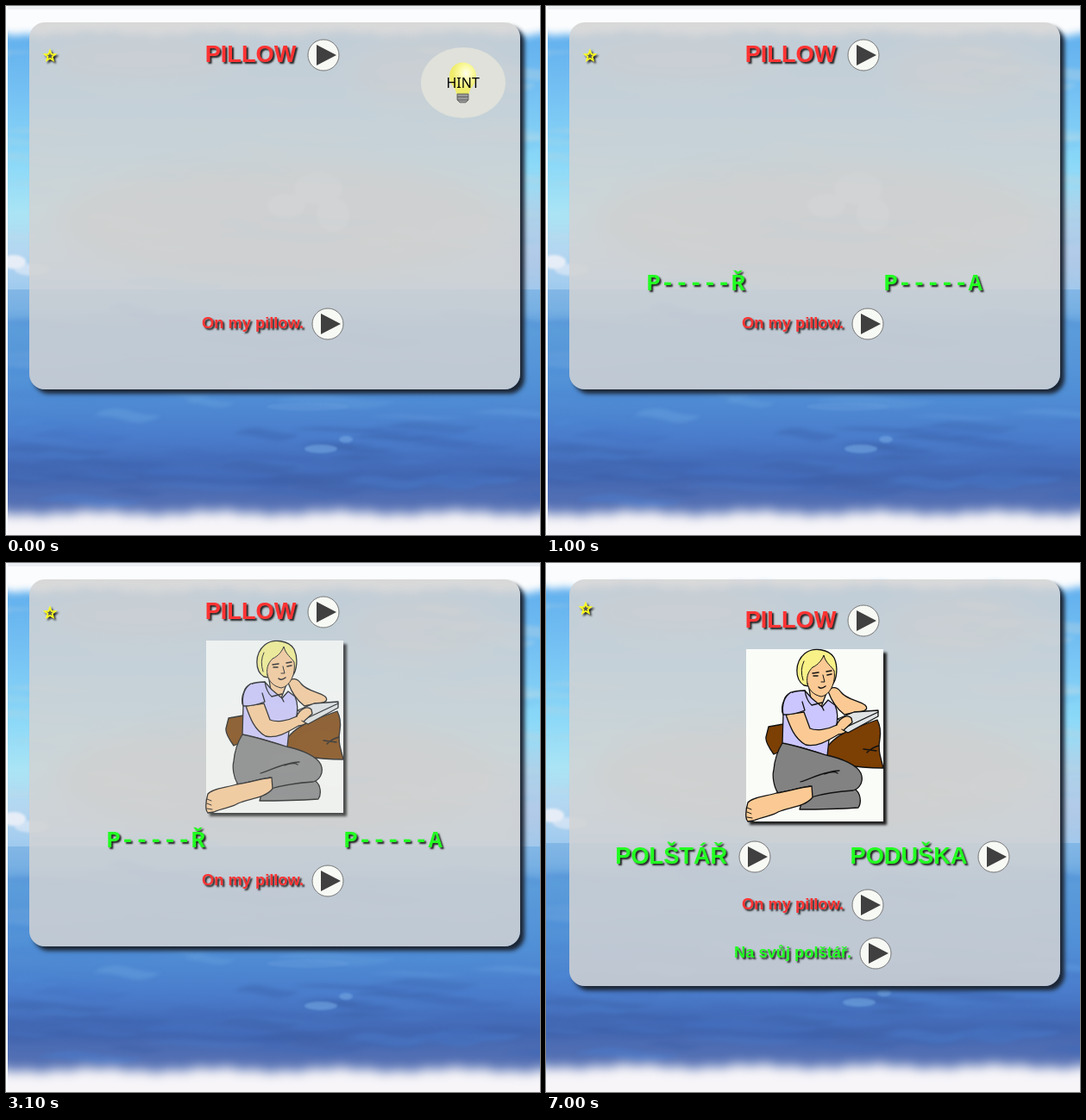
Recreate the animation shown at these times as an HTML page. Size 619 by 614 pixels, loop 8000 ms.

```html
<!DOCTYPE html>
<html lang="en">
<head>
<meta charset="utf-8">
<title>Vocabulary card</title>
<style>
  html, body { margin: 0; width: 100%; height: 100%; overflow: hidden; background: #fbfcfd; }
  svg, #panel { position: absolute; left: 0; top: 0; }
  #panel {
    left: 27px; top: 19px; width: 569px; height: 426px; border-radius: 18px;
    background: rgba(211, 211, 211, .85); box-shadow: 5px 5px 5px #1c2533;
  }
  text { font: bold 27.2px "Liberation Sans", Arial, sans-serif; text-shadow: 2px 2px 2px #222; white-space: pre; }
  .small { font-size: 18.3px; }
  .mono { font-family: "Liberation Mono", "Courier New", monospace; }
  .en { fill: #f33; }
  .cs { fill: #2f2; }
  #hint text { font: 16px "Noto Sans", "Open Sans", sans-serif; text-shadow: none; }
  #line { stroke: #111; stroke-width: 1.3; stroke-linejoin: round; stroke-linecap: round; }
</style>
</head>
<body>
<svg width="619" height="614">
  <defs>
    <linearGradient id="sky" gradientUnits="userSpaceOnUse" x1="0" y1="0" x2="0" y2="329">
      <stop offset=".1" stop-color="#62b0ee"/>
      <stop offset=".3" stop-color="#74c0f3"/>
      <stop offset=".55" stop-color="#8ad8f8"/>
      <stop offset=".73" stop-color="#aae4f5"/>
      <stop offset=".87" stop-color="#b4d6f0"/>
      <stop offset="1" stop-color="#9fcaee"/>
    </linearGradient>
    <linearGradient id="sea" gradientUnits="userSpaceOnUse" x1="0" y1="329" x2="0" y2="614">
      <stop offset="0" stop-color="#82b7e6"/>
      <stop offset=".08" stop-color="#78b0e3"/>
      <stop offset=".16" stop-color="#5b9cdb"/>
      <stop offset=".4" stop-color="#5190d6"/>
      <stop offset=".6" stop-color="#4a7dcc"/>
      <stop offset=".76" stop-color="#4266b1"/>
      <stop offset=".88" stop-color="#5571b4"/>
    </linearGradient>
    <clipPath id="skyClip"><path d="M2 4H640V329H2z"/></clipPath>
    <clipPath id="seaClip"><path d="M2 329H640V630H2z"/></clipPath>
  </defs>
  <g id="back">
    <path fill="url(#sky)" d="M2 4H640V329H2z"/>
    <g clip-path="url(#skyClip)">
      <g style="filter:blur(14px)">
        <ellipse cx="320" cy="250" rx="260" ry="70" fill="#b9bfc0" opacity=".85"/>
        <ellipse cx="615" cy="270" rx="45" ry="55" fill="#b0bfe0" opacity=".5"/>
        <ellipse cx="480" cy="75" rx="80" ry="35" fill="#aebfc8" opacity=".6"/>
        <ellipse cx="160" cy="60" rx="110" ry="25" fill="#b4c4cc" opacity=".6"/>
      </g>
      <g id="skyMarks" style="filter:blur(2px)"></g>
      <g fill="#e6edf7" style="filter:blur(1.5px)">
        <ellipse cx="9" cy="297" rx="14" ry="8"/>
        <ellipse cx="30" cy="306" rx="20" ry="7" opacity=".6"/>
        <g opacity=".4">
          <ellipse cx="362" cy="212" rx="28" ry="19"/>
          <ellipse cx="379" cy="242" rx="19" ry="20"/>
          <ellipse cx="325" cy="232" rx="22" ry="14"/>
          <ellipse cx="540" cy="262" rx="48" ry="18" opacity=".5"/>
        </g>
      </g>
    </g>
    <path fill="url(#sea)" d="M2 329H640V630H2z"/>
    <g clip-path="url(#seaClip)">
      <g id="seaMarks" style="filter:blur(2px)"></g>
      <g style="filter:blur(1px)" fill="#70a3df" opacity=".65">
        <ellipse cx="365" cy="514" rx="19" ry="5"/>
        <ellipse cx="394" cy="503" rx="8" ry="4"/>
        <ellipse cx="350" cy="465" rx="48" ry="5" opacity=".5"/>
      </g>
    </g>
    <path id="foam" fill="#f7f5f8" style="filter:blur(7px)"/>
    <path id="mist" fill="#fbfcfd" style="filter:blur(5px)"/>
    <path fill="#fbfcfd" d="M0 0H2V620H0z"/>
  </g>
  <path id="strip" fill="#eceff3" d="M2 0H619V4H2z"/>
</svg>

<div id="panel"></div>

<svg width="619" height="614">
  <defs>
    <g id="play">
      <circle r="18" fill="#f7f9f4" stroke="#777"/>
      <path d="M-8-12 15 0-8 12z" fill="#404040"/>
    </g>
    <radialGradient id="bulb" cx=".62" cy=".35">
      <stop offset="0" stop-color="#fffff0"/>
      <stop offset=".5" stop-color="#fbfaa0"/>
      <stop offset="1" stop-color="#efec6c"/>
    </radialGradient>
  </defs>

  <g id="star" style="filter:drop-shadow(2px 2px 1px #222)">
    <path id="starShape" fill="#555" stroke="#ff2" stroke-width="1.800"/>
  </g>

  <g id="title">
    <text class="en" x="230.700" y="65">PILLOW</text>
    <use href="#play" x="368" y="57"/>
  </g>

  <g id="hint">
    <ellipse cx="530" cy="89" rx="49" ry="41" fill="#dfe1da"/>
    <path fill="url(#bulb)" d="M522 102C522 94 514 93 514 81A15.500 15.500 0 0 1 545 81C545 93 537 94 537 102z"/>
    <path fill="#999" stroke="#555" stroke-width=".8" d="M523 102h13v7l-3 3h-7l-3-3zM523 105.500h13M523 109h13"/>
    <text x="510.500" y="95">HINT</text>
  </g>

  <g id="figure">
    <path fill="#fafcf8" d="M232 90h159v200h-159z" style="filter:drop-shadow(4px 4px 1.600px #222)"/>
    <g id="line">
      <g fill="#7c3f04">
        <path d="M258 180 275 177 280 205 264 212Q254 198 255 192z"/>
        <path d="M325 205C335 190 350 184 384 172Q389 182 387 194C384 208 389 218 391 228Q366 228 345 224L326 214z"/>
        <path fill="none" d="M386 202Q378 204 372 210M383 208 368 206"/>
      </g>
      <path fill="#fbca94" d="M327 139C331 132 338 134 342 140 349 149 362 149 370 155 375 160 368 163 360 163L346 166C338 160 331 150 327 139z"/>
      <path fill="#fbca94" d="M304 130 307 148 319 157 325 141z"/>
      <path fill="#f8f188" d="M299 132C288 125 288 105 300 95 310 87 328 90 334 100 339 111 337 125 332 131L305 133z"/>
      <path fill="#fbca94" stroke-width="1" d="M303 130C301 120 306 114 309 111 316 108 320 102 322 97 324 106 331 110 334 115 336 128 330 143 319 145 310 143 305 138 303 130z"/>
      <path fill="none" stroke-width="1" d="M299 104Q294 114 298 126"/>
      <path fill="none" stroke-width="1.500" d="M309 118 316 117M325 116 331 115M310 121 315 121M326 120 331 119M316 134Q319 137 324 133"/>
      <path fill="none" stroke-width="1" d="M321 120 323 128 319 128"/>
      <path fill="#cbc6fe" d="M300 138C286 138 278 142 276 149 273 156 273 162 275 166L274 200C291 202 309 208 326 214L328 195 336 182Q340 166 335 155L327 149 320 157 308 147z"/>
      <path fill="none" d="M300 138Q302 150 308 155L320 152M320 157 322 161"/>
      <path fill="#fbca94" d="M278 166C283 180 288 194 301 201 314 204 327 196 339 189 349 188 357 180 354 170 348 167 340 172 337 178 325 184 313 185 306 182L299 163z"/>
      <path fill="#cbc6fe" d="M284 140C276 145 273 155 275 166Q288 166 300 161L297 151"/>
      <path fill="#e1e4e4" d="M338 171 357 163 385 161 385 168 350 187 343 183 349 178z"/>
      <path fill="none" d="M349 180 385 163"/>
      <path fill="#fbca94" d="M337 178C340 170 349 165 354 170L355 175 345 184"/>
      <path fill="#828282" d="M298 262C320 254 340 254 357 252 365 256 366 268 362 274Q330 276 294 276z"/>
      <path fill="#828282" d="M274 199C290 202 312 209 325 213 344 217 361 225 365 234 369 244 363 252 356 254 340 255 320 258 307 262L306 249 269 257C264 250 262 237 264 230 265 218 269 207 274 199z"/>
      <path fill="none" d="M295 244C310 239 326 231 340 231M323 235Q334 231 338 234"/>
      <path fill="#fbca94" d="M308 249C291 251 282 255 267 257 254 261 239 262 234 268 231 278 231 287 234 290L241 289C251 284 262 284 269 279 281 273 299 274 309 262z"/>
      <path fill="none" stroke-width="1" d="M233 274 238 276M233 279 238 281M233 285 239 286"/>
    </g>
  </g>

  <g id="clues" class="cs">
    <text class="mono" x="116.500" y="330">P-----Ř</text>
    <text class="mono" x="391.500" y="330">P-----A</text>
  </g>

  <g id="answers" class="cs">
    <text x="80.300" y="349">POLŠTÁŘ</text>
    <use href="#play" x="242" y="341"/>
    <text x="352.500" y="349">PODUŠKA</text>
    <use href="#play" x="519" y="341"/>
    <text class="small" x="218" y="458">Na svůj polštář.</text>
    <use href="#play" x="382" y="453"/>
  </g>

  <g id="sentence">
    <text class="en small" x="227" y="374">On my pillow.</text>
    <use href="#play" x="373" y="369"/>
  </g>
</svg>

<script>
const el = id => document.getElementById(id);
const show = (id, on) => el(id).style.display = on ? '' : 'none';
const move = (id, x, y) => el(id).setAttribute('transform', `translate(${x} ${y})`);

let seed = 11;
const rnd = (a, b) => {
  seed = seed * 16807 % 2147483647;
  return a + (b - a) * seed / 2147483647;
};

// Irregular horizontal brush marks
function marks(id, count, top, bottom, colours, alpha) {
  let out = '';
  for (let i = 0; i < count; i++) {
    const x = rnd(-20, 640), y = rnd(top, bottom), w = rnd(25, 85), h = rnd(2, 7);
    out += `<path fill="${colours[i % colours.length]}" opacity="${rnd(alpha / 2, alpha)}"
      d="M${x - w} ${y}q${w / 2} ${-h * 2} ${w} ${-h}t${w} ${h}q${-w / 2} ${h * 2} ${-w} ${h}t${-w} ${-h}z"/>`;
  }
  el(id).innerHTML += out;
}
marks('skyMarks', 55, 50, 325, ['#b8d4df', '#79c4ee', '#c9d9df'], .35);
marks('seaMarks', 45, 350, 490, ['#4a86d2', '#6ba4de', '#4f8fd8'], .45);
marks('seaMarks', 60, 480, 575, ['#3c5fa5', '#4a7ccb', '#4069b6'], .5);

// Soft wavy edge between the picture and the white page
function edge(id, base, end) {
  let d = `M-20 ${end}`;
  for (let x = -20; x <= 660; x += 8)
    d += `L${x} ${base + 2 * Math.sin(x * .045) + 1.5 * Math.sin(x * .19)}`;
  el(id).setAttribute('d', d + `L660 ${end}z`);
}
edge('foam', 588, 660);
edge('mist', 32, -30);

let star = 'M';
for (let i = 0; i < 10; i++) {
  const r = i % 2 ? 2.7 : 6.3, a = i * Math.PI / 5;
  star += `${r * Math.sin(a)} ${-r * Math.cos(a)} `;
}
el('starShape').setAttribute('d', star + 'z');

function draw(now) {
  const t = now % 8000, solved = t >= 7000;
  const fade = t < 2900 ? 0 : Math.min(1, (Math.floor((t - 2900) / 100) + 1) / 4);
  show('hint', t < 1000);
  move('hint', 0, t < 500 ? 0 : -2);
  show('clues', t >= 1000 && !solved);
  show('answers', solved);
  show('strip', !solved);
  el('figure').style.opacity = fade;
  el('panel').style.height = (solved ? 472 : 426) + 'px';
  move('back', solved ? -2 : 0, solved ? -4 : 0);
  move('star', solved ? 46 : 51, solved ? 53 : 58);
  move('title', 0, solved ? 10 : 0);
  move('figure', 0, solved ? 10 : 0);
  move('sentence', 0, solved ? 28 : 0);
  requestAnimationFrame(draw);
}
requestAnimationFrame(draw);
</script>
</body>
</html>
```
